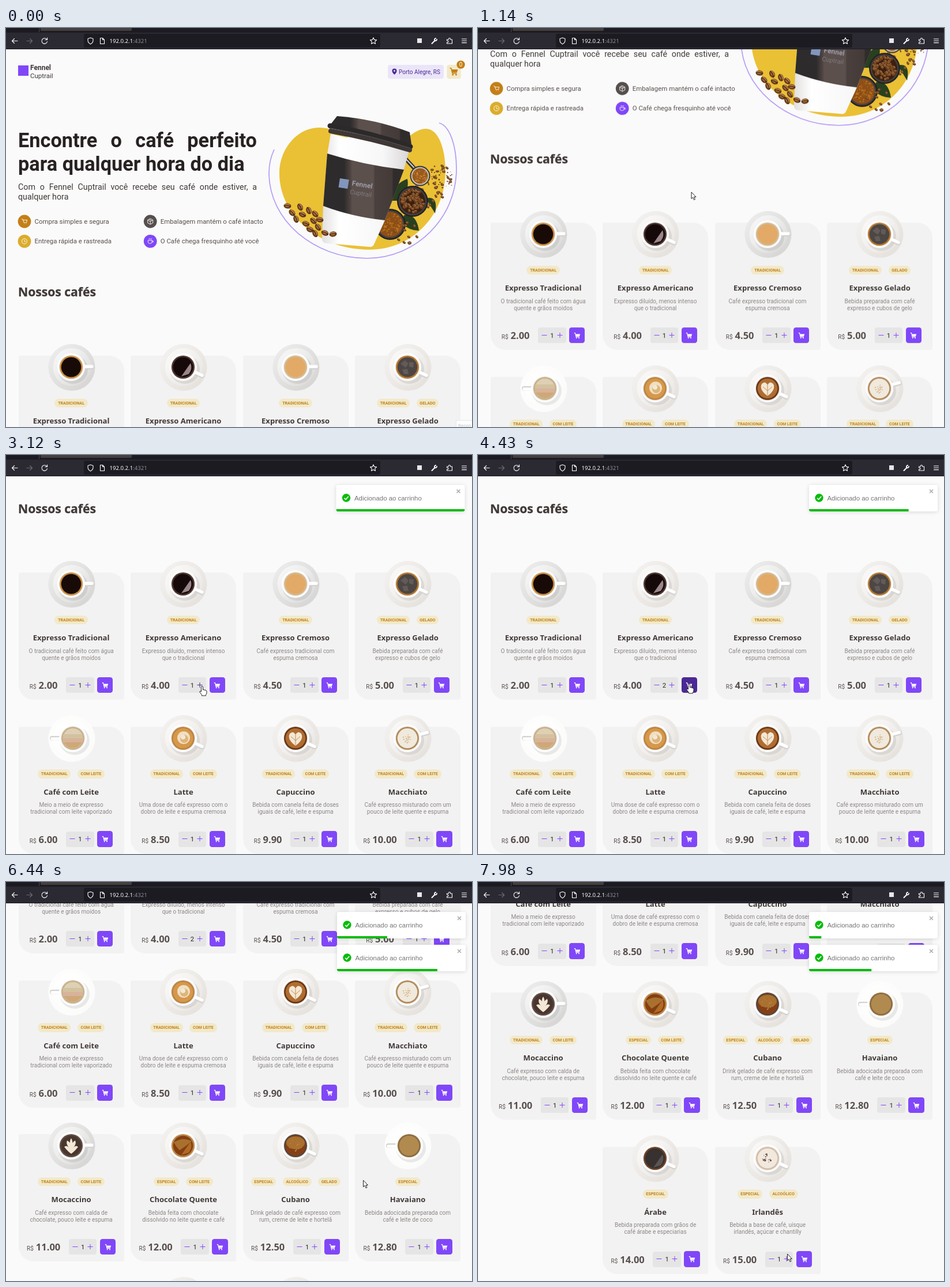
Recreate the animation shown at these times as an HTML page. Size 808x693 px, loop 8000 ms.

```html
<!DOCTYPE html>
<html lang="pt">
<head>
<meta charset="utf-8">
<title>Cafés</title>
<style>
html, body { margin: 0; width: 100%; height: 100%; overflow: hidden; background: #fafafa; }
body { position: relative; font: 11.43px Roboto, sans-serif; color: #574f4d; }
svg { display: block; overflow: visible; }
#page, #page > *, .card > *, #bar, #pointer, .toast, .toast > *, #status { position: absolute; }
#page { left: 0; top: 0; width: 808px; will-change: transform; }
h1, h2, h3, p { margin: 0; }
h1 { left: 21px; top: 174.8px; width: 414px; font: 700 34.3px/40.9px Roboto, sans-serif; color: #272221; text-align: justify; }
.lead { left: 21px; top: 268px; width: 414px; font-size: 14.28px; line-height: 17.1px; color: #403937; text-align: justify; }
h2 { left: 21px; top: 443px; font: 700 21.1px/30px "Noto Sans", sans-serif; color: #403937; white-space: nowrap; -webkit-text-stroke: .3px; }
.card { width: 183px; height: 221.4px; background: #f3f2f2; border-radius: 4px 26px; }
.card > * { left: 0; width: 100%; text-align: center; }
.card > .cup { left: 91.4px; top: 20.4px; width: 1px; height: 1px; }
.tags { top: 74.5px; display: flex; justify-content: center; gap: 11.4px; }
.tags span { padding: 0 5.7px; border-radius: 8px; background: #f1e9c9; color: #c47f17; font-weight: 700; font-size: 7.14px; line-height: 15.5px; }
h3 { top: 103px; font: 700 13.05px/20px "Noto Sans", sans-serif; color: #403937; }
.card p { top: 130.5px; font-size: 10px; line-height: 12px; color: #8d8686; white-space: nowrap; }
.buy { top: 182px; height: 27px; display: flex; justify-content: center; align-items: center; }
.buy > span { font-size: 10px; margin-right: 14.7px; }
.buy b { font: 700 16.5px "Noto Sans", sans-serif; margin-left: 4px; }
.count { display: flex; justify-content: space-between; align-items: center; width: 42.5px; height: 27px; padding: 0 3px; border-radius: 4px; background: #e6e5e5; color: #272221; }
.count em { font-style: normal; }
button { border: 0; padding: 0; width: 16px; height: 14px; background: none; color: #8047f8; display: grid; place-items: center; }
button.hot { color: #4b2995; }
button.add { width: 27.2px; height: 27.2px; margin-left: 5.5px; border-radius: 4.3px; background: #8047f8; color: #fff; }
button.add.hot { background: #4b2995; }
.toast { left: 574px; width: 223.4px; height: 45.5px; border-radius: 3px; background: #fff; box-shadow: 0 1px 7px rgba(0,0,0,.14); overflow: hidden; }
.toast span { left: 31.5px; top: 0; font: 11.43px/46px "Liberation Sans", Arial, sans-serif; color: #757575; white-space: nowrap; }
.toast i { left: 0; bottom: 0; width: 100%; height: 3.6px; background: #07bc0c; transform-origin: 0 0; }
#bar, #pointer { left: 0; top: 0; }
#pointer { pointer-events: none; }
#status { right: 0; bottom: 0; width: 27px; height: 11px; border: solid #e6e6e6; border-width: 1px 0 0 1px; background: #fdfdfd; color: #c4c4c4; font-size: 8px; line-height: 17px; text-indent: 3px; overflow: hidden; }
</style>
</head>
<body>
<div id="page"></div>
<div id="status">Recon</div>
<svg id="bar" width="808" height="37" fill="none" stroke="#fbfbfe" stroke-width="1.1" stroke-linecap="round" stroke-linejoin="round">
  <g stroke="none">
    <path fill="#1c1b22" d="M0 0H808V37H0Z"/>
    <path fill="#45403f" d="M60 0H218V3Q218 5 216 5H62Q60 5 60 3Z"/>
    <path fill="#4a4953" d="M57 0h1v7h-1Z"/>
    <path fill="#2b2a33" d="M0 8H808V36H0Z"/>
    <rect x="135" y="10" width="514" height="24" rx="3" fill="#1c1b22"/>
    <text x="179.500" y="26" font-family="Noto Sans, sans-serif" font-size="9.600" fill="#fbfbfe">192.0.2.1<tspan fill="#8f8d98">:4321</tspan></text>
    <rect x="713" y="18" width="8" height="8" fill="#e8e8ec"/>
  </g>
  <path d="M20 22.500H10.500m4-4-4 4 4 4"/>
  <path stroke="#6d6c76" d="M36 22.500h9.500m-4-4 4 4-4 4"/>
  <path d="M70.500 19.500a4.800 4.800 0 1 0 1 4M71.500 17v3.500H68"/>
  <path d="M146.500 17l4.500 1.500v3q0 4-4.500 6.500-4.500-2.500-4.500-6.500v-3Z"/>
  <path d="M163.500 17.500h4l3 3v7h-7Zm4 0v3h3"/>
  <path d="m637 16.800 1.700 3.600 3.900.5-2.900 2.700.8 3.900-3.500-1.900-3.500 1.900.8-3.900-2.900-2.700 3.900-.5Z"/>
  <path stroke-width="2" d="m738.500 27 5-5m0 0a2.500 2.500 0 0 0 3.500-2m-3.500 2a2.500 2.500 0 0 1 1.500-4"/>
  <path d="M764.500 20h3v-1a1.500 1.500 0 0 1 3 0v1h3v7h-9v-2h1a1.500 1.500 0 0 0 0-3h-1Z"/>
  <path d="M790.500 19h8m-8 3.300h8m-8 3.300h8"/>
</svg>
<svg id="pointer" width="1" height="1" fill="#fff" stroke="#222" stroke-width="1" stroke-linejoin="round">
  <path id="arrow" d="M.5 0V11.500L3 9.200 5 13.500 7 12.600 5 8.500H8.500Z"/>
  <path id="hand" d="M-1.500 9V1.200Q-1.500-.3 0-.3T1.500 1.200V6Q3 4.600 4 6.400 5.500 5.300 6.200 7 8 6.500 8 8.500V11Q8 13 6.500 14.500V16H-.5V14.500L-4 10Q-4.500 8-3 8Z"/>
</svg>
<script>
const $ = id => document.getElementById(id);
const page = $('page');

let seed = 11;
const rnd = () => (seed = seed * 16807 % 2147483647) / 2147483647;
const repeat = (n, make) => Array.from({ length: n }, (_, i) => make(i)).join('');
const dot = (x, y, r, fill) => `<circle cx="${x}" cy="${y}" r="${r}" fill="${fill}"/>`;
const cart = size => `<svg width="${size}" height="${size}" viewBox="0 0 16 16" fill="currentColor"><path d="M4 4.500H15L13.300 10H5.600Z"/><path d="M1 2.200H3.300L5.500 11.300H13" fill="none" stroke="currentColor" stroke-width="1.500"/><circle cx="6.300" cy="13.700" r="1.400"/><circle cx="12" cy="13.700" r="1.400"/></svg>`;

// Hero picture
const bean = (x, y, s) => `<g transform="translate(${x} ${y}) rotate(${rnd() * 90 - 20}) scale(${s})"><ellipse rx="6.500" ry="4.600" fill="#6b3c1a"/><ellipse cx="-.5" cy="-1" rx="5" ry="2.800" fill="#b07a48"/><path d="M-6 .5Q0-2 6 .5" fill="none" stroke="#3a200f" stroke-width="1.300"/></g>`;
const inDisc = (cx, cy, r) => {
  const a = rnd() * 7, d = r * Math.sqrt(rnd());
  return [cx + d * Math.cos(a), cy + d * Math.sin(a)];
};
const grains = (n, x, y, r, fill) => repeat(n, () => dot(...inDisc(x, y, r), .5 + rnd(), fill));
const beans = (n, x, y, r, size) => repeat(n, () => bean(...inDisc(x, y, r), size));
const bowl = (x, y, r, fill) => dot(x, y, r + 5, '#242122') + dot(x, y, r + 2.5, '#454040') + dot(x, y, r, fill);
const badge = (x, y, fill, label, icon) => `${dot(x, y, 11.4, fill)}<path transform="translate(${x} ${y})" d="${icon}" fill="none" stroke="#fff" stroke-width=".9" stroke-linejoin="round"/><text x="${x + 17.5}" y="${y + 4}">${label}</text>`;
const spill = [[488, 309], [496, 321], [510, 311], [514, 324], [525, 317], [503, 332], [520, 340], [536, 323], [533, 335], [541, 346], [527, 350], [544, 333], [536, 357], [553, 356], [567, 358]];

const hero = `<svg width="808" height="430" fill="#574f4d" font-family="Roboto, sans-serif" font-size="11.430">
<defs>
  <linearGradient id="paper"><stop stop-color="#e2e0df"/><stop offset=".2" stop-color="#fff"/><stop offset=".7" stop-color="#f8f7f7"/><stop offset="1" stop-color="#d9d6d6"/></linearGradient>
  <linearGradient id="sleeve"><stop offset=".26" stop-color="#2d2b2b"/><stop offset=".34" stop-color="#4f4542"/><stop offset=".36" stop-color="#5c504c"/><stop offset=".62" stop-color="#5c504c"/><stop offset=".64" stop-color="#4a413f"/><stop offset=".85" stop-color="#443b39"/><stop offset=".87" stop-color="#302c2c"/></linearGradient>
  <linearGradient id="shade" x2="1" y2="1"><stop stop-color="#fff" stop-opacity=".65"/><stop offset="1" stop-color="#fff" stop-opacity="0"/></linearGradient>
</defs>
<rect x="21" y="65" width="18" height="18" fill="#8047f8"/>
<text x="42" y="72.500" font-size="12" font-weight="700" fill="#403937">Fennel</text>
<text x="42" y="87" font-size="11.500" fill="#403937">Cuptrail</text>
<rect x="662" y="64" width="97" height="24.300" rx="4" fill="#ebe5f9"/>
<path d="M673.500 70.500a4 4 0 0 1 4 4q0 3-4 6.500-4-3.500-4-6.500a4 4 0 0 1 4-4Z" fill="#4b2995"/>${dot(673.5, 74.5, 1.4, '#ebe5f9')}
<text x="681" y="79.500" font-size="10" fill="#4b2995">Porto Alegre, RS</text>
<rect x="764.500" y="64" width="24.300" height="24.300" rx="4" fill="#f1e9c9"/>
<g transform="translate(768.500 67.500)" color="#c47f17">${cart(16)}</g>
${dot(788.6, 63.6, 7.2, '#c47f17')}<text x="788.600" y="67.200" font-size="10" text-anchor="middle" fill="#fff">0</text>
${badge(32, 336, '#c47f17', 'Compra simples e segura', 'M-5-4H-3L-1 2H3.500L4.500-2.500H-2.500M-1 4h.5M3 4h.5')}
${badge(32, 370.4, '#dbac2c', 'Entrega rápida e rastreada', 'M-4.500 0a4.500 4.500 0 1 0 9 0a4.500 4.500 0 1 0-9 0M0-2.500V.5H2.500')}
${badge(250.2, 336, '#574f4d', 'Embalagem mantém o café intacto', 'M0-5 4.500-2.500V2.500L0 5-4.500 2.500V-2.500ZM-4.500-2.500 0 0 4.500-2.500M0 0V5M-2-3.800 2.300-1.300')}
${badge(250.2, 370.4, '#8047f8', 'O Café chega fresquinho até você', 'M-4-1.500H3V1Q3 4-.5 4T-4 1ZM3-.5H5V1.500H3M-2-5v2M0-5v2M2-5v2')}
<path d="M474 252C474 210 505 172 545 173 580 174 600 200 640 215 680 225 695 176 728 175 752 175 762 215 762 248 762 325 705 385 630 385 542 385 474 325 474 252Z" fill="#eac035"/>
<path d="M465 211C458 226 456 238 456 252 456 333 533 400 626 400 711 400 781 330 781 245 781 205 770 170 751 165" fill="none" stroke="#b49bf8" stroke-width="1.700"/>
<path d="M664 300Q672 270 696 262 700 282 684 300ZM690 325Q712 322 716 352 700 352 686 340ZM728 296Q750 290 744 322Z" fill="#28401f"/>
<path d="M690 224 710 246" stroke="#343132" stroke-width="7"/>
<path d="M692 226 708 243" stroke="#d5d2cf" stroke-width="2"/>
${beans(14, 730, 285, 30, .45)}
${dot(718, 257, 17.5, '#3b3634')}${dot(718, 257, 15.5, '#c9c4be')}${dot(718, 257, 13.5, '#9a5a1c')}${grains(35, 718, 257, 12, '#c98636')}
${bowl(666, 341, 22, '#8d4f17')}${grains(90, 666, 341, 20, '#b8701f')}
${bowl(705, 301, 22, '#3a2010')}${beans(75, 705, 301, 20, .5)}
${grains(40, 752, 262, 24, '#6b401f')}${beans(16, 750, 258, 24, .45)}${beans(12, 694, 355, 20, .45)}
<path d="M563 184 699 214 690 245 657 334 638 376Q636 381 629 380L556 374Q547 373 548 364L550 309 557 219Z" fill="url(#paper)"/>
<path d="M557 218Q620 238 690 246L657 334Q600 328 550 309Z" fill="url(#sleeve)"/>
<path d="M574 153Q640 158 700 181L703 202 560 171Z" fill="url(#sleeve)"/>
<path d="M562 170Q635 183 701 206" fill="none" stroke="#2b2929" stroke-width="9" stroke-linecap="round"/>
<path d="M563 179Q635 192 700 212" fill="none" stroke="#3d3736" stroke-width="8" stroke-linecap="round"/>
<path d="M563 174Q635 187 701 209" fill="none" stroke="#5b5351" stroke-width="1"/>
<g transform="translate(579 261) rotate(9)"><rect width="16" height="16" fill="#8296bd"/><text x="22" y="9" font-size="12" font-weight="700" fill="#9b9cab">Fennel</text><text x="21" y="24" font-size="11" fill="#7f7a80">Cuptrail</text></g>
${spill.map(([x, y]) => bean(x, y, 1)).join('')}
</svg>`;

// Coffee cups seen from above
const shine = fill => `<path d="M-3 16 13-7Q17 3 10 12Z" fill="${fill}"/>`;
const cream = d => `<path d="${d}" fill="#f3e8d6"/>`;
const specks = fill => grains(16, -1, 0, 8, fill);
const art = {
  none: '',
  glare: shine('#9a858b'),
  ice: '<path d="M-12-6-4-12 2-6-3 1ZM3-9 11-8 10 1 3-1ZM-9 4 0 3 2 12-6 12Z" fill="#635b58"/>',
  layers: '<path d="M-17-7H17V0H-17Z" fill="#d3c2a0"/><path d="M-17 0H17V7H-17Z" fill="#d8b39a"/><path d="M-16 7H16Q10 17 0 17T-16 7Z" fill="#cfa878"/>',
  swirl: dot(1, -1, 11, '#f0dfc2') + dot(2, 1, 7, '#ddb57a') + dot(0, -2, 4, '#f3e8d6'),
  heart: cream('M0 13Q-15 2-10-8-4-14 0-6 4-14 10-8 15 2 0 13Z') + '<path d="M0-6V12M-8-3 0 4 8-3" fill="none" stroke="#c58a4e"/>',
  crumbs: specks('#d6b78c'),
  leaf: cream('M0 14Q-6 10-12 2-8-2-3 4-10-3-7-9-1-6-1 0-4-7 0-13 4-7 1 0 1-6 7-9 10-3 3 4 8-2 12 2 6 10 0 14Z'),
  wave: shine('#b06a25') + '<path d="M-16-6Q0-16 15-8 6 0-6 8-12 2-16-6Z" fill="#a9712f"/>',
  foam: '<ellipse cy="-5" rx="16" ry="11" fill="#a9702f"/>' + grains(25, 0, -3, 12, '#b57e3e'),
  slab: shine('#5a5452'),
  chips: specks('#5b4336')
};
const GREY = '#d3d2d1', CREAM = '#e3dfda', WHITE = '#fbfbfa';
const cup = (angle, plate, ring, coffee, deco) => {
  const shift = angle === 180 ? 3 : 0;
  return `<svg class="cup">${dot(1, .5, 40.5, plate)}${dot(1, .5, 40.5, 'url(#shade)')}${dot(1.5, 0, 33, 'url(#shade)')}
<g transform="translate(${shift})"><ellipse cx="3" cy="4" rx="26" ry="25" fill="#000" opacity=".08"/>
<path transform="rotate(${angle})" d="M22 0H36" stroke="${GREY}" stroke-width="8" stroke-linecap="round"/>
<path transform="rotate(${angle})" d="M22-1H36" stroke="#fff" stroke-width="5.500" stroke-linecap="round"/>
${dot(0, 0, 24, '#fff')}${dot(0, 0, 21.5, '#f1efed')}${dot(0, 0, 20, ring)}${dot(0, 0, 17.3, coffee)}${art[deco]}</g></svg>`;
};

const T = 'TRADICIONAL', L = 'COM LEITE', E = 'ESPECIAL', A = 'ALCOÓLICO', G = 'GELADO';
const products = [
  ['Expresso Tradicional', [T], 'O tradicional café feito com água', 'quente e grãos moídos', 2, 0, GREY, '#c88d42', '#180b07', 'none'],
  ['Expresso Americano', [T], 'Expresso diluído, menos intenso', 'que o tradicional', 4, 25, CREAM, '#49332b', '#15090a', 'glare'],
  ['Expresso Cremoso', [T], 'Café expresso tradicional com', 'espuma cremosa', 4.5, 0, GREY, '#d6b88c', '#e2aa66', 'none'],
  ['Expresso Gelado', [T, G], 'Bebida preparada com café', 'expresso e cubos de gelo', 5, 25, CREAM, '#b3752d', '#4c4644', 'ice'],
  ['Café com Leite', [T, L], 'Meio a meio de expresso', 'tradicional com leite vaporizado', 6, 180, WHITE, '#c9b089', '#ddd0b4', 'layers'],
  ['Latte', [T, L], 'Uma dose de café expresso com o', 'dobro de leite e espuma cremosa', 8.5, 25, CREAM, '#bd8442', '#d6984a', 'swirl'],
  ['Capuccino', [T, L], 'Bebida com canela feita de doses', 'iguais de café, leite e espuma', 9.9, 25, CREAM, '#6b3715', '#b06d31', 'heart'],
  ['Macchiato', [T, L], 'Café expresso misturado com um', 'pouco de leite quente e espuma', 10, -15, CREAM, '#b48a58', '#f0e9dd', 'crumbs'],
  ['Mocaccino', [T, L], 'Café expresso com calda de', 'chocolate, pouco leite e espuma', 11, 0, GREY, '#5d4a42', '#49362e', 'leaf'],
  ['Chocolate Quente', [E, L], 'Bebida feita com chocolate', 'dissolvido no leite quente e café', 12, 25, CREAM, '#b98443', '#853e12', 'wave'],
  ['Cubano', [E, A, G], 'Drink gelado de café expresso com', 'rum, creme de leite e hortelã', 12.5, 25, CREAM, '#59453a', '#853f16', 'foam'],
  ['Havaiano', [E], 'Bebida adocicada preparada com', 'café e leite de coco', 12.8, 180, WHITE, '#8d6c3c', '#b18a50', 'none'],
  ['Árabe', [E], 'Bebida preparada com grãos de', 'café árabe e especiarias', 14, 25, CREAM, '#6d4227', '#37312f', 'slab'],
  ['Irlandês', [E, A], 'Bebida a base de café, uísque', 'irlandês, açúcar e chantilly', 15, 25, CREAM, '#d5bda6', '#f1e8de', 'chips']
];
const sign = d => `<button><svg width="10" height="10"><path d="${d}" stroke="currentColor"/></svg></button>`;
const card = ([name, tags, line1, line2, price, ...look], i) => {
  const slot = i < 12 ? i : i + 1;
  return `<div class="card" style="left:${21.6 + slot % 4 * 194.5}px;top:${569 + Math.floor(slot / 4) * 267.5}px">
${cup(...look)}<div class="tags">${tags.map(tag => `<span>${tag}</span>`).join('')}</div>
<h3>${name}</h3><p>${line1}<br>${line2}</p>
<div class="buy"><span>R$<b>${price.toFixed(2)}</b></span><div class="count">${sign('M.5 4.500H9.500')}<em>1</em>${sign('M.5 4.500H9.500M5 0V9')}</div><button class="add">${cart(12)}</button></div></div>`;
};
page.innerHTML = hero + `<h1>Encontre o café perfeito para qualquer hora do dia</h1>
<p class="lead">Com o Fennel Cuptrail você recebe seu café onde estiver, a qualquer hora</p>
<h2>Nossos cafés</h2>` + products.map(card).join('');

// Toasts
const toasts = [[52, 2455, 3250], [109.2, 4550, 5290]].map(([top, enter, drain]) => {
  const box = document.createElement('div');
  box.className = 'toast';
  box.style.top = top + 'px';
  box.innerHTML = `<svg width="223" height="45">${dot(17.5, 22.5, 7.2, '#07bc0c')}<path d="M14 22.700 16.600 25.300 21.200 20" fill="none" stroke="#fff" stroke-width="1.600"/><path d="m209 8 6 6m0-6-6 6" stroke="#a0a0a0" stroke-width="1.200"/></svg><span>Adicionado ao carrinho</span><i></i>`;
  document.body.insertBefore(box, $('bar'));
  return { box, fill: box.querySelector('i'), enter, drain };
});

// Timeline: rows of [ms, ...values]
const LOOP = 8000, ENTER = 720, DRAIN = 5230;
const linear = x => x;
const smooth = x => x * x * (3 - 2 * x);
const easeOut = x => 1 - (1 - x) ** 3;
const sample = (rows, t, ease) => {
  const next = rows.findIndex(row => row[0] > t);
  if (next < 1) return rows.at(next).slice(1);
  const [t0, ...a] = rows[next - 1], [t1, ...b] = rows[next];
  const k = ease((t - t0) / (t1 - t0));
  return a.map((v, i) => v + (b[i] - v) * k);
};
const scrolling = [[680, 0], [860, 68.5], [1200, 265], [1400, 365], [5770, 365], [6400, 666], [6600, 666], [7330, 912]];
const moves = [[70, 812, 470], [680, 369.5, 285], [1500, 369.5, 285], [1720, 250, 347], [2200, 171, 396], [2560, 171, 396], [3040, 340, 402], [3800, 340, 402], [4030, 366, 398], [4900, 366, 398], [5250, 450, 412], [5600, 536, 397], [5720, 536, 397], [6250, 619, 518], [6750, 619, 518], [7850, 536, 646]];
const bounce = [[0, 2143], [.6, -18], [.75, 7], [.9, -3.6], [1, 0]];
const quantity = document.querySelectorAll('.count em')[1];
let hot = null;

function draw() {
  const t = performance.now() % LOOP;
  page.style.transform = `translateY(${-sample(scrolling, t, linear)[0]}px)`;
  quantity.textContent = t < 3500 ? 1 : 2;
  $('status').hidden = t >= 70;

  for (const { box, fill, enter, drain } of toasts) {
    const k = (t - enter) / ENTER;
    box.style.visibility = k < 0 ? 'hidden' : 'visible';
    box.style.opacity = easeOut(Math.min(1, Math.max(0, k / .6)));
    box.style.transform = `translateX(${sample(bounce, k, easeOut)[0]}px)`;
    fill.style.transform = `scaleX(${Math.min(1, Math.max(0, 1 - (t - drain) / DRAIN))})`;
  }

  const [x, y] = sample(moves, t, smooth);
  $('pointer').style.transform = `translate(${x}px, ${y}px)`;
  $('pointer').style.visibility = t < 70 ? 'hidden' : 'visible';
  hot?.classList.remove('hot');
  hot = document.elementFromPoint(x, y)?.closest('button');
  hot?.classList.add('hot');
  $('hand').style.display = hot ? '' : 'none';
  $('arrow').style.display = hot ? 'none' : '';
  requestAnimationFrame(draw);
}
draw();
</script>
</body>
</html>
```
